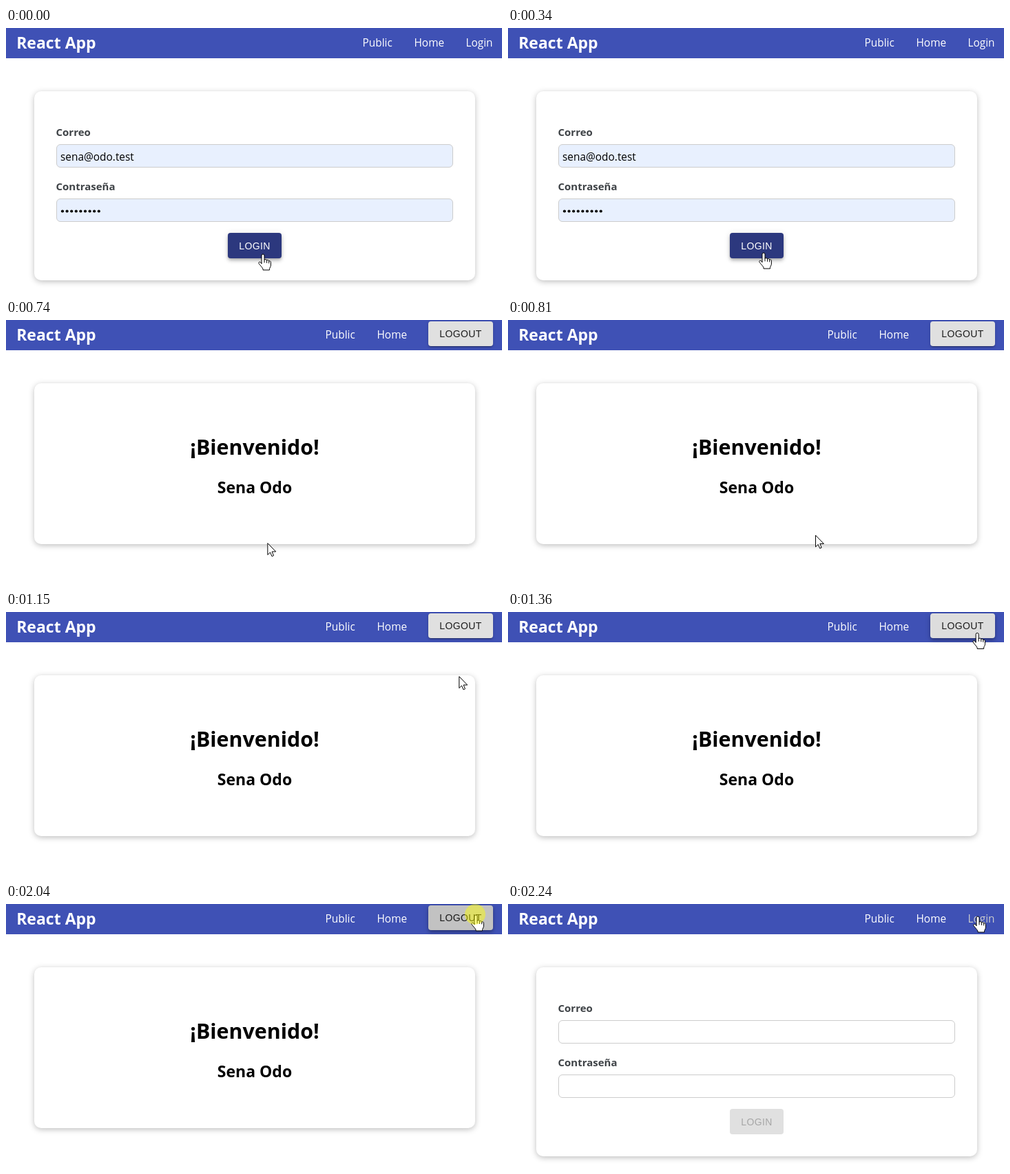
Animation of 720x384 px, one loop 2.77 s. Source, as an HTML page:

```html
<!DOCTYPE html>
<html lang="es">
<head>
<meta charset="utf-8">
<title>React App</title>
<style>
html, body { margin: 0; width: 100%; height: 100%; overflow: hidden; background: #fff; }
#stage { position: absolute; left: 0; top: 0; width: 720px; height: 384px; overflow: hidden; background: #fff; }
#stage div, svg { position: absolute; box-sizing: border-box; }
svg { left: 0; top: 0; }
.nav { left: 0; top: 0; width: 720px; height: 44px; background: #3f51b5; }
.card { left: 41px; top: 92px; width: 640px; border-radius: 10px; background: #fff; box-shadow: 0 2px 8px rgba(0,0,0,.26); }
.field { left: 73px; width: 576px; height: 34px; border: 1px solid #ccc; border-radius: 6px; }
.filled .field { background: #e8f0fe; }
.btn { display: flex; align-items: center; justify-content: center; border-radius: 4px;
  font: 14px "Liberation Sans", Arial, sans-serif; letter-spacing: .4px; }
#login { left: 322px; top: 298px; width: 78px; height: 37px; background: #e0e0e0; color: #a6a6a6; }
#logout { left: 613px; top: 2px; width: 94px; height: 36px; color: rgba(0,0,0,.87);
  box-shadow: 0 3px 1px -2px rgba(0,0,0,.2), 0 2px 2px rgba(0,0,0,.14), 0 1px 5px rgba(0,0,0,.12); }
.filled #login { background: #2c387e; color: #fff; }
.filled #login, .hover #logout {
  box-shadow: 0 2px 4px -1px rgba(0,0,0,.2), 0 4px 5px rgba(0,0,0,.14), 0 1px 10px rgba(0,0,0,.12); }
text { font: 15.4px "Open Sans", "Noto Sans", sans-serif; }
.title, .h1, .h2, .label { font-weight: 700; }
.title, .h2 { font-size: 23px; }
.h1 { font-size: 30.4px; }
.h1, .h2 { text-anchor: middle; }
.label { font-size: 15px; fill: #3f4347; }
.white { fill: #fff; }
.cursor { fill: #fff; stroke: #000; stroke-linejoin: round; stroke-linecap: round; }
.form, .home { visibility: hidden; }
.on-form .form, .on-home .home { visibility: visible; }
.value { display: none; }
.filled .value { display: inline; }
</style>
</head>
<body>
<div id="stage">
  <div class="nav"></div>
  <div class="card" id="card"></div>
  <div class="field form" style="top:169px"></div>
  <div class="field form" style="top:248px"></div>
  <div class="btn form" id="login">LOGIN</div>
  <div class="btn home" id="logout">LOGOUT</div>
  <svg width="720" height="384" viewBox="0 0 720 384">
    <text class="title white" x="15.2" y="30">React App</text>
    <g class="form">
      <g class="white">
        <text x="517.5" y="27">Public</text>
        <text x="592.5" y="27">Home</text>
        <text x="667.5" y="27" id="link">Login</text>
      </g>
      <text class="label" x="72.5" y="157">Correo</text>
      <text class="label" x="72.5" y="236">Contraseña</text>
      <g class="value" id="values"><text x="79" y="193">sena@odo.test</text></g>
    </g>
    <g class="home">
      <g class="white">
        <text x="463.5" y="27">Public</text>
        <text x="538.5" y="27">Home</text>
      </g>
      <text class="h1" x="361" y="196">¡Bienvenido!</text>
      <text class="h2" x="361" y="252" id="user">Sena Odo</text>
    </g>
    <g class="cursor" id="arrow">
      <path d="M.5 .5V17L4.2 13.4 6.7 19.2 9.2 18.1 6.8 12.4H12z"/>
    </g>
    <g class="cursor" id="hand">
      <path d="M-2 13.5V2a2 2 0 0 1 4 0V8.2C3 7.2 5.4 7.5 5.6 9 6.6 8.2 8.4 8.6 8.7 10 9.8 9.4 11.4 10 11.4 11.8V16c0 2.5-1.7 3.5-1.9 5.5V23H0V21.5C-1 19-4.5 16-6 13.4c-.9-1.8 1.2-2.9 2.6-1.6z"/>
      <path d="M2 8.2V12M5.6 9V12.5M8.7 10V13" fill="none"/>
    </g>
    <circle id="click" r="15" fill="#ff0" fill-opacity=".47"/>
  </svg>
</div>
<script>
const LOOP = 2770, STEP = 66.6, PRESS = 130;
const HOME = 610, USER = 740, HOVER = 1350, LEAVE = 2170, LINK = 2240;

const $ = id => document.getElementById(id);
const show = (el, on) => { el.style.display = on ? "" : "none"; };
const place = (el, x, y) => el.setAttribute("transform", `translate(${x} ${y})`);
const mix = (a, b, p) => a + (b - a) * p;
const clamp = p => Math.min(1, Math.max(0, p));
const easeOut = (p, power) => 1 - (1 - p) ** power;

// Pointer sets off slowly, crosses the card evenly, then settles on the button
function glide(t) {
  const n = Math.floor((t - HOME) / STEP);
  if (n < 3) {
    const p = (n / 3) ** 2;
    return [mix(371, 446, p), mix(326, 313, p)];
  }
  if (n < 7) {
    const p = (n - 3) / 4;
    return [mix(446, 627, p), mix(313, 132, p)];
  }
  const p = clamp((n - 7) / 8);
  return [mix(627, 682, easeOut(p, 6)), mix(132, 16, easeOut(p, 3))];
}

function pointer(t) {
  if (t < 70) return [373, 329];
  if (t < HOME) return [371, 327];
  return t < LINK ? glide(t) : [682, 18];
}

function render(t) {
  const home = t >= HOME && t < LEAVE;
  const user = t >= USER;
  const hover = t >= HOVER;
  $("stage").className = (home ? "on-home" : "on-form") + (t < HOME ? " filled" : "") + (hover ? " hover" : "");
  $("card").style.height = (home ? (user ? 234 : 182) : 275) + "px";
  show($("user"), user);

  const grey = Math.round(mix(224, 194, easeOut(clamp((t - HOVER) / 250), 2)));
  $("logout").style.background = `rgb(${grey},${grey},${grey})`;
  $("link").style.fill = t >= LINK ? "#ccc" : "";

  const [x, y] = pointer(t);
  const arrow = t >= HOME && !hover;
  show($("arrow"), arrow);
  show($("hand"), !arrow);
  place($(arrow ? "arrow" : "hand"), x, y);

  show($("click"), [210, LEAVE - PRESS].some(at => t >= at && t < at + PRESS));
  place($("click"), x - 1, y - 1);
}

for (let i = 0; i < 9; i++) {
  const dot = document.createElementNS("http://www.w3.org/2000/svg", "circle");
  dot.setAttribute("cx", 82 + 6.6 * i);
  dot.setAttribute("cy", 266.5);
  dot.setAttribute("r", 2.1);
  $("values").append(dot);
}

const start = performance.now();
function tick() {
  render((performance.now() - start) % LOOP);
  requestAnimationFrame(tick);
}
tick();
</script>
</body>
</html>
```
